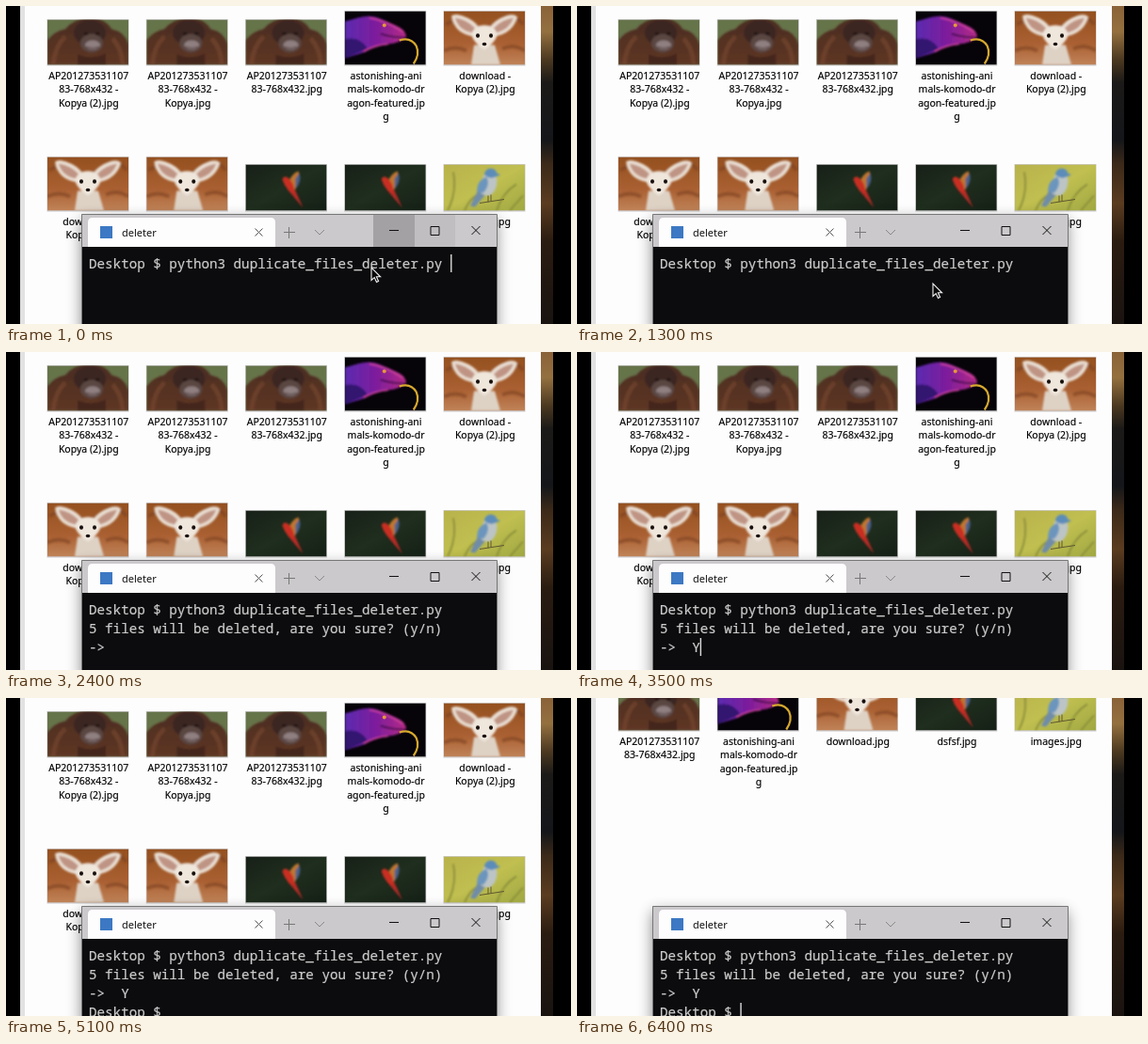
An HTML page for the animation above (6.5 s loop, 600 by 338 pixels).

```html
<!DOCTYPE html>
<html lang="en">
<head>
<meta charset="utf-8">
<title>Duplicate files deleter</title>
<style>
  html, body { margin: 0; width: 100%; height: 100%; overflow: hidden; background: #000; }
  svg { display: block; width: 600px; height: 338px; }
  .label { font: 10.5px "Noto Sans", "Open Sans", sans-serif; fill: #000; stroke: #000; stroke-width: .15; text-anchor: middle; }
  .tab { font: 11px "Noto Sans", "Open Sans", sans-serif; fill: #111; }
  .term { font: 14.22px "Noto Sans Mono", "DejaVu Sans Mono", monospace; fill: #ccc; stroke: #ccc; stroke-width: .2; white-space: pre; }
</style>
</head>
<body>
<svg viewBox="0 0 600 338">
  <defs>
    <filter id="soft" x="-5%" y="-5%" width="110%" height="110%"><feGaussianBlur stdDeviation=".8"/></filter>
    <filter id="shadow" x="-10%" y="-20%" width="120%" height="140%"><feGaussianBlur stdDeviation="8"/></filter>
    <linearGradient id="wall" x2="0" y2="1">
      <stop offset="0" stop-color="#8a6238"/><stop offset=".08" stop-color="#94703f"/>
      <stop offset=".17" stop-color="#4b3820"/><stop offset=".24" stop-color="#1c1a18"/>
      <stop offset=".42" stop-color="#14161a"/><stop offset=".5" stop-color="#3d2a19"/>
      <stop offset=".62" stop-color="#5a3c20"/><stop offset=".74" stop-color="#2b1c11"/>
      <stop offset="1" stop-color="#191310"/>
    </linearGradient>
    <linearGradient id="hair" x2="0" y2="1">
      <stop offset="0" stop-color="#4a2c20"/><stop offset="1" stop-color="#5f3625"/>
    </linearGradient>
    <linearGradient id="scales">
      <stop offset="0" stop-color="#5b2bb0"/><stop offset=".5" stop-color="#7c1d9c"/>
      <stop offset="1" stop-color="#b32a86"/>
    </linearGradient>
    <linearGradient id="clay" x2="0" y2="1">
      <stop offset="0" stop-color="#94501f"/><stop offset=".6" stop-color="#aa6032"/>
      <stop offset="1" stop-color="#c08358"/>
    </linearGradient>
    <linearGradient id="leaf" x2="1" y2="1">
      <stop offset="0" stop-color="#182018"/><stop offset=".5" stop-color="#1f2e1e"/>
      <stop offset="1" stop-color="#152016"/>
    </linearGradient>
    <linearGradient id="meadow" x2="1" y2="1">
      <stop offset="0" stop-color="#b9b24c"/><stop offset=".5" stop-color="#c0bf50"/>
      <stop offset="1" stop-color="#a0a842"/>
    </linearGradient>

    <symbol id="ape" viewBox="0 0 86 48">
      <rect width="86" height="48" fill="#66744a"/>
      <g filter="url(#soft)">
        <path d="M0 48V22Q8 12 19 10Q28-1 45-2Q62-1 68 10Q82 13 86 26V48Z" fill="url(#hair)"/>
        <path d="M6 48Q8 28 19 18M80 48Q79 30 69 20" fill="none" stroke="#74452e" stroke-width="5" opacity=".7"/>
        <ellipse cx="45" cy="14" rx="17" ry="13" fill="#3a2620"/>
        <ellipse cx="47" cy="25" rx="12" ry="10" fill="#5a4643"/>
        <ellipse cx="48" cy="27" rx="8" ry="5" fill="#8f7f80"/>
        <path d="M41 29q7 3 14 0" stroke="#4a3436" fill="none"/>
        <path d="M39 15h4M51 15h4" stroke="#120c0a" stroke-width="2"/>
        <path d="M32 37Q47 43 62 36V48H32Z" fill="#44271e"/>
      </g>
    </symbol>
    <symbol id="lizard" viewBox="0 0 86 57">
      <rect width="86" height="57" fill="#060309"/>
      <g filter="url(#soft)">
        <path d="M0 11L14 7Q28 3 38 8L54 15Q66 20 65 28Q58 34 46 35Q32 37 20 44L0 50Z" fill="url(#scales)"/>
        <path d="M0 30Q16 26 24 40L0 50Z" fill="#32156f"/>
        <path d="M64 28Q50 28 38 24" fill="none" stroke="#2c0a3c" stroke-width="1.6"/>
        <path d="M26 7Q42 9 62 22M46 35Q32 36 20 43" fill="none" stroke="#d2429f" stroke-width="1.6"/>
      </g>
      <circle cx="42" cy="15" r="2" fill="#e8963a"/>
      <path d="M58 31Q70 27 76 37Q80 46 73 56" fill="none" stroke="#d6a82e" stroke-width="2.2"/>
    </symbol>
    <symbol id="fox" viewBox="0 0 86 57">
      <rect width="86" height="57" fill="url(#clay)"/>
      <g filter="url(#soft)">
        <path d="M2 14q15-9 28 0t28-3 26 3M0 42q12-6 24 0M62 40q12-6 24 2" fill="none" stroke="#7d4220" stroke-width="4" opacity=".6"/>
        <path d="M32 36L29 57H60L54 36Z" fill="#ded2c5"/>
        <path d="M32 27Q11 24 8 5Q12 2 20 5Q32 9 38 18ZM54 27Q74 23 78 6Q74 2 66 5Q54 9 48 18Z" fill="#e9ddd1"/>
        <path d="M30 23Q15 20 12 7Q25 9 33 18ZM56 23Q70 19 74 7Q61 9 53 18Z" fill="#bf9484"/>
        <path d="M29 25Q33 14 43 15Q53 14 57 25Q54 34 43 41Q32 34 29 25Z" fill="#efe6dc"/>
      </g>
      <ellipse cx="36" cy="26" rx="2" ry="2.2" fill="#17100d"/>
      <ellipse cx="50" cy="26" rx="2" ry="2.2" fill="#17100d"/>
      <ellipse cx="43" cy="35" rx="2.3" ry="1.7" fill="#17100d"/>
    </symbol>
    <symbol id="parrot" viewBox="0 0 86 49">
      <rect width="86" height="49" fill="url(#leaf)"/>
      <g filter="url(#soft)">
        <path d="M44 26L61 46L52 26Z" fill="#b52c25"/>
        <path d="M46 18Q49 10 56 7Q60 17 52 27Z" fill="#c0762f"/>
        <path d="M53 15L57 9Q60 18 53 26Z" fill="#4a618c"/>
        <path d="M39 16Q40 11 45 14Q52 20 52 31Q43 28 39 16Z" fill="#c92e24"/>
      </g>
    </symbol>
    <symbol id="jay" viewBox="0 0 86 49">
      <rect width="86" height="49" fill="url(#meadow)"/>
      <g filter="url(#soft)">
        <path d="M4 49Q14 30 10 8M22 49Q27 36 38 31M56 49Q62 30 77 21M70 49L84 33" fill="none" stroke="#868a38" stroke-width="1.6"/>
        <path d="M38 24L28 44L33 45L46 30Z" fill="#6f8ca8"/>
        <path d="M43 10Q51 9 56 14Q58 26 49 33Q39 34 37 25Z" fill="#bcc4c6"/>
        <path d="M35 29Q35 17 45 13Q50 21 42 30Z" fill="#6c95bd"/>
        <path d="M43 11Q43 5 50 4Q56 5 56 9L60 11L55 13Q49 16 43 11Z" fill="#5c8cb9"/>
      </g>
      <path d="M47 33v7M50 32v7M38 41L64 37" stroke="#5e562f" fill="none"/>
    </symbol>
  </defs>

  <rect width="600" height="338"/>
  <rect x="568" width="13" height="338" fill="url(#wall)"/>
  <rect x="15" width="553" height="338" fill="#fefdfe"/>
  <rect x="15" width="5" height="338" fill="#e2e1e2"/>
  <g id="before"></g>
  <g id="after"></g>

  <rect x="80" y="227" width="441" height="125" opacity=".45" filter="url(#shadow)"/>
  <rect x="80" y="221" width="441" height="117" fill="#0c0b0d"/>
  <rect x="80" y="221" width="441" height="35" fill="#cbc9cb"/>
  <path d="M80.5 338V221.5H521.5V338" fill="none" stroke="#777"/>
  <path d="M87 256V230q0-5 5-5H281q5 0 5 5V256Z" fill="#fefdfe"/>
  <rect x="100" y="234" width="13" height="13" fill="#3c78c3"/>
  <text class="tab" x="123" y="245">deleter</text>
  <g id="hover">
    <rect x="390" y="222" width="44" height="34" fill="#a3a1a3"/>
    <rect x="434" y="222" width="43" height="34" fill="#c0bec0"/>
  </g>
  <g fill="none" stroke="#555">
    <path d="M264.500 236.500l8 8m0-8l-8 8"/>
    <path d="M295 240.500h12M300.500 235v12" stroke="#777"/>
    <path d="M328 238l5 5 5-5" stroke="#888"/>
    <path d="M407 238.500h10M451 234.500h9v9h-9ZM494.500 234l9 9m0-9l-9 9" stroke="#111"/>
  </g>
  <g id="lines"></g>
  <rect id="caret" width="1.4" height="19" fill="#ddd"/>
  <path id="mouse" d="M0 0V13.500L3.200 10.600L5.500 15.500L7.600 14.500L5.400 9.800H9.600Z" fill="#080808" stroke="#f2f2f2" stroke-width="1.1"/>
</svg>
<script>
const LOOP = 6500, STEP = 100, BLINK = 530;
const CHAR = 8.535, LEFT = 88, LINE = 20;
const ENTER = 1600, TYPE_Y = 3100, CONFIRM = 4250, REFRESH = 5200;
const $ = id => document.getElementById(id);

function add(parent, tag, attrs, text = '') {
  const el = document.createElementNS(parent.namespaceURI, tag);
  for (const key in attrs) el.setAttribute(key, attrs[key]);
  el.textContent = text;
  return parent.appendChild(el);
}

const heights = { ape: 48, lizard: 57, fox: 57, parrot: 49, jay: 49 };
const apeName = 'AP201273531107';
const lizardName = ['astonishing-ani', 'mals-komodo-dr', 'agon-featured.jp', 'g'];

function fileRow(parent, bottom, files) {
  files.forEach(([kind, ...names], i) => {
    const x = 44 + i * 105.25, height = heights[kind], y = bottom - height + 0.5;
    add(parent, 'rect', { x: x - .5, y: y - .5, width: 87, height: height + 1.5, fill: '#c9c8c9' });
    add(parent, 'use', { href: '#' + kind, x, y, width: 86, height });
    names.forEach((name, n) =>
      add(parent, 'text', { class: 'label', x: x + 43.8, y: bottom + 15.7 + n * 14.4 }, name));
  });
}

fileRow($('before'), 62, [
  ['ape', apeName, '83-768x432 -', 'Kopya (2).jpg'],
  ['ape', apeName, '83-768x432 -', 'Kopya.jpg'],
  ['ape', apeName, '83-768x432.jpg'],
  ['lizard', ...lizardName],
  ['fox', 'download -', 'Kopya (2).jpg']
]);
fileRow($('before'), 217, [
  ['fox', 'download -', 'Kopya.jpg'],
  ['fox', 'download.jpg'],
  ['parrot', 'dsfsf - Kopya.jpg'],
  ['parrot', 'dsfsf.jpg'],
  ['jay', 'images.jpg']
]);
fileRow($('after'), 34, [
  ['ape', apeName, '83-768x432.jpg'],
  ['lizard', ...lizardName],
  ['fox', 'download.jpg'],
  ['parrot', 'dsfsf.jpg'],
  ['jay', 'images.jpg']
]);

// Text, row and the time it appears
const lines = [
  ['Desktop $ python3 duplicate_files_deleter.py', 0, 0],
  ['5 files will be deleted, are you sure? (y/n)', 1, ENTER],
  ['->', 2, ENTER],
  ['    Y', 2, TYPE_Y],
  ['Desktop $', 3, CONFIRM]
].map(([text, row, from]) => ({
  from,
  el: add($('lines'), 'text', { class: 'term', x: LEFT, y: 279 + row * LINE }, text)
}));

// Start, column, row; blinking restarts with each key press
const carets = [
  [-300, 45, 0], [ENTER, 4, 2], [TYPE_Y, 5, 2], [CONFIRM, 10, 3]
];

// The pointer hides while typing, then sweeps up and out of the picture
const settle = { from: 0, to: ENTER, at: t => {
  const rest = Math.exp(-t / 90);
  return [378 + 10 * rest, 295 - 17 * rest];
} };
const leave = { from: 5300, to: 6000, at: t => {
  const k = (t - 5600) / 300, speed = k < 0 ? k : k * (1 + k);
  return [350 - 28 * speed, 232 - 63 * speed];
} };

function show(el, visible) {
  el.style.visibility = visible ? 'visible' : 'hidden';
}

function render(t) {
  show($('before'), t < REFRESH);
  show($('after'), t >= REFRESH);
  lines.forEach(line => show(line.el, t >= line.from));
  $('hover').style.opacity = Math.max(0, 1 - t / 200);

  const [start, column, row] = carets.filter(c => c[0] <= t).pop();
  $('caret').setAttribute('x', LEFT + column * CHAR);
  $('caret').setAttribute('y', 264 + row * LINE);
  show($('caret'), Math.floor((t - start) / BLINK) % 2 === 0);

  const sweep = [settle, leave].find(s => t >= s.from && t < s.to);
  show($('mouse'), sweep);
  if (sweep) $('mouse').setAttribute('transform', `translate(${sweep.at(t).map(Math.round)})`);
}

const begin = performance.now();
function tick() {
  const t = (performance.now() - begin) % LOOP;
  render(Math.floor(t / STEP) * STEP);
  requestAnimationFrame(tick);
}
tick();
</script>
</body>
</html>
```
